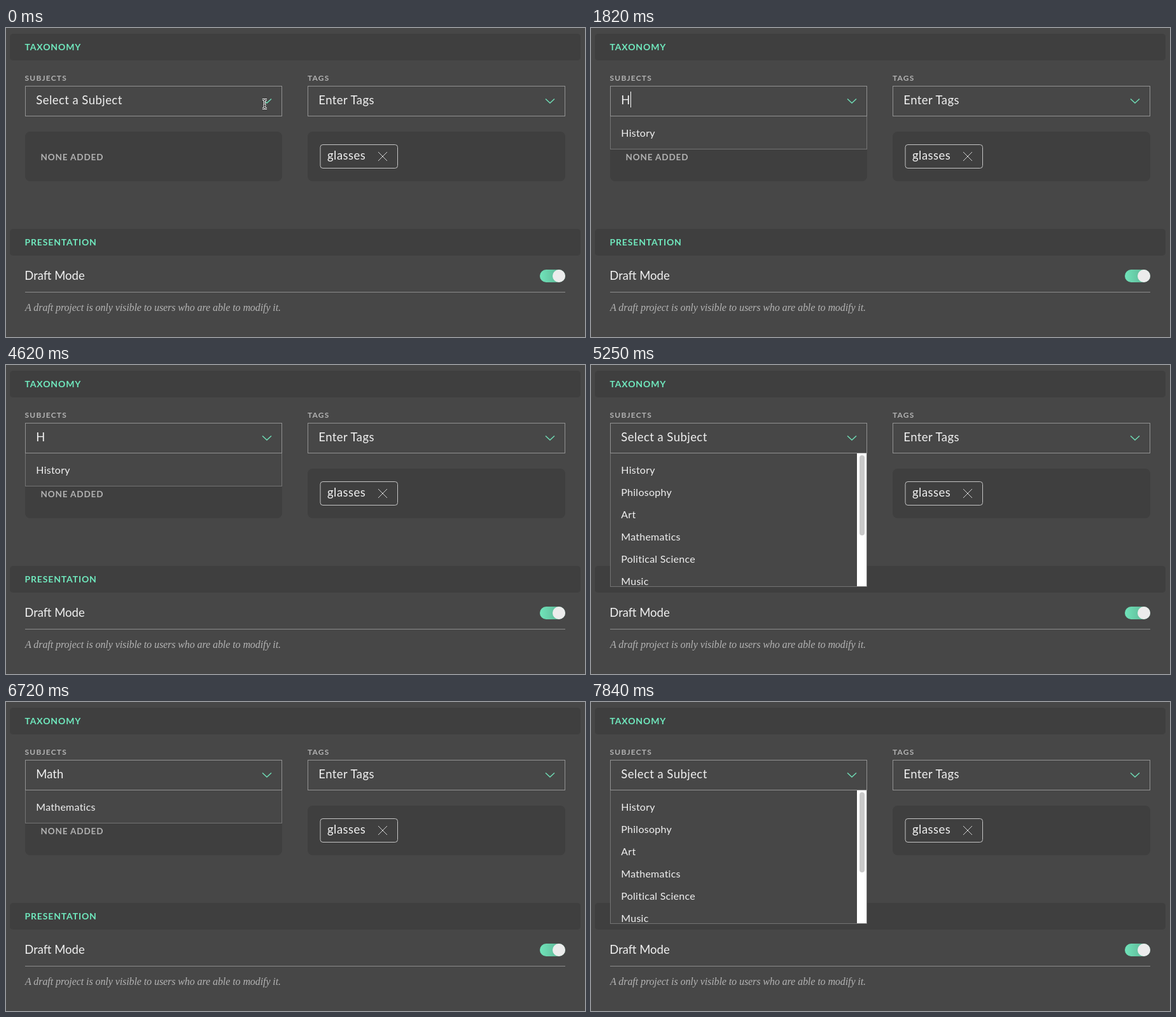
These frames come from a looping animation (910 px wide and 486 px high, 8 s). An HTML page:

```html
<!DOCTYPE html>
<html lang="en">
<head>
<meta charset="utf-8">
<title>Taxonomy form</title>
<style>
  html, body { margin: 0; width: 100%; height: 100%; overflow: hidden; background: #474747; }
  svg { display: block; width: 910px; height: 486px; font-family: Lato, "Open Sans", sans-serif; }
  text { fill: #f0f0f0; white-space: pre; }
  .panel { fill: #3f3f3f; }
  .box { fill: none; stroke: #929292; }
  .head { font-size: 14px; font-weight: 700; letter-spacing: .85px; fill: #70e9be; }
  .label { font-size: 12px; font-weight: 700; letter-spacing: 1.2px; fill: #b2b2b2; }
  .none { font-size: 13.5px; font-weight: 700; letter-spacing: .85px; fill: #b2b2b2; }
  .field { font-size: 18.5px; }
  .hint { letter-spacing: .45px; }
  .item { font-size: 16px; letter-spacing: .25px; }
  .note { font: italic 16px "Liberation Serif", serif; letter-spacing: -.08px; fill: #b4b4b4; }
  .chevron { fill: none; stroke: #6fdcb5; stroke-width: 1.5; }
</style>
</head>
<body>
<svg viewBox="0 0 910 486">
  <defs>
    <linearGradient id="green">
      <stop offset="0" stop-color="#70e4ba"/>
      <stop offset="1" stop-color="#5aa98c"/>
    </linearGradient>
    <clipPath id="clip"><rect id="clipBox" x="30" y="139" width="404"/></clipPath>
    <path id="beam" d="M-3.5 -7H-1.5L0 -5.5L1.5 -7H3.5M0 -5.5V5.5M-3.5 7H-1.5L0 5.5L1.5 7H3.5M-2 2.5H2"/>
  </defs>

  <rect class="panel" x="6" y="9" width="897" height="42" rx="5"/>
  <text class="head" x="29.5" y="35">TAXONOMY</text>

  <text class="label" x="29.5" y="83">SUBJECTS</text>
  <rect class="box" x="30.5" y="91.5" width="403" height="47"/>
  <text class="field" id="input" x="47.3" y="120"></text>
  <path class="chevron" d="M403 111.5L410 118L417 111.5"/>
  <rect class="panel" x="30" y="163" width="404" height="78" rx="8"/>
  <text class="none" x="54.5" y="208">NONE ADDED</text>

  <text class="label" x="474" y="83">TAGS</text>
  <rect class="box" x="474.5" y="91.5" width="404" height="47"/>
  <text class="field hint" x="491.3" y="120">Enter Tags</text>
  <path class="chevron" d="M848 111.5L855 118L862 111.5"/>
  <rect class="panel" x="474" y="163" width="405" height="78" rx="8"/>
  <rect x="494" y="183.5" width="121.5" height="37" rx="4" fill="none" stroke="#c4c4c4"/>
  <text class="field hint" x="505" y="207">glasses</text>
  <path d="M585 195L599 209M599 195L585 209" stroke="#d0d0d0"/>

  <rect class="panel" x="6" y="316" width="897" height="42" rx="5"/>
  <text class="head" x="29.5" y="342">PRESENTATION</text>
  <text class="field" x="29.3" y="396">Draft Mode</text>
  <rect x="839" y="380" width="40" height="20" rx="10" fill="url(#green)"/>
  <circle cx="869" cy="390" r="10" fill="#ececec"/>
  <path d="M30 415.5H879" stroke="#8c8c8c"/>
  <text class="note" x="30" y="445">A draft project is only visible to users who are able to modify it.</text>

  <g id="menu">
    <rect id="menuBox" x="30.5" y="138.5" width="403" fill="#474747" stroke="#747474"/>
    <path d="M30 138.5H434" stroke="#929292"/>
    <g id="items" clip-path="url(#clip)"></g>
    <g id="scroll">
      <rect x="418" y="139" width="15" height="209" fill="#fff"/>
      <rect x="422" y="142" width="8" height="126" rx="4" fill="#c9c9c9"/>
    </g>
  </g>
  <rect id="caret" y="100" width="1" height="25" fill="#fff"/>
  <g id="pointer" fill="none">
    <use href="#beam" stroke="#fff" stroke-width="3.2" stroke-linejoin="round"/>
    <use href="#beam" stroke="#222" stroke-width="1.1"/>
  </g>
</svg>
<script>
const LOOP = 8000, OPEN = 350, FIRST_KEY = 1820;
const subjects = ['History', 'Philosophy', 'Art', 'Mathematics', 'Political Science', 'Music'];
const typed = [
  [0, ''], [FIRST_KEY, 'H'], [2310, 'Hi'], [2660, 'His'], [3850, 'Hi'], [4130, 'H'], [4690, ''],
  [5460, 'M'], [5670, 'Ma'], [5880, 'Mat'], [6090, 'Math'],
  [6860, 'Mat'], [7000, 'Ma'], [7280, 'M'], [7840, '']
];
// Moments at which the caret flips, starting hidden
const blinks = [OPEN, 840, 1400, 3150, 3710, 4620, 4760, 5250, 5460, 6580, 6860, 7700];

const $ = id => document.getElementById(id);
const show = (id, on) => $(id).setAttribute('visibility', on ? 'inherit' : 'hidden');

const rows = subjects.map(name => {
  const row = document.createElementNS('http://www.w3.org/2000/svg', 'text');
  row.setAttribute('class', 'item');
  row.setAttribute('x', 47.3);
  row.textContent = name;
  $('items').append(row);
  return row;
});

function drawMenu(value) {
  let count = 0;
  rows.forEach((row, i) => {
    const match = subjects[i].startsWith(value);
    row.setAttribute('visibility', match ? 'inherit' : 'hidden');
    if (match) row.setAttribute('y', 171 + 35 * count++);
  });
  const height = Math.min(17 + 35 * count, 210);
  $('menuBox').setAttribute('height', height);
  $('clipBox').setAttribute('height', height - 1);
  show('scroll', !value);
}

function draw(t) {
  const value = typed.findLast(([at]) => at <= t)[1];
  const input = $('input');
  input.textContent = value || 'Select a Subject';
  input.classList.toggle('hint', !value);

  drawMenu(value);
  show('menu', t >= OPEN);
  if (t < OPEN) show('scroll', false);

  const end = value ? input.getComputedTextLength() : 0;
  $('caret').setAttribute('x', Math.round(47.6 + end));
  show('caret', blinks.filter(at => at <= t).length % 2);

  const p = Math.min(t / OPEN, 1);
  $('pointer').setAttribute('transform', `translate(${406.5 + 9 * p} ${119.5 - 2 * p})`);
  show('pointer', t < FIRST_KEY);
}

function tick() {
  draw(performance.now() % LOOP);
  requestAnimationFrame(tick);
}
tick();
</script>
</body>
</html>
```
